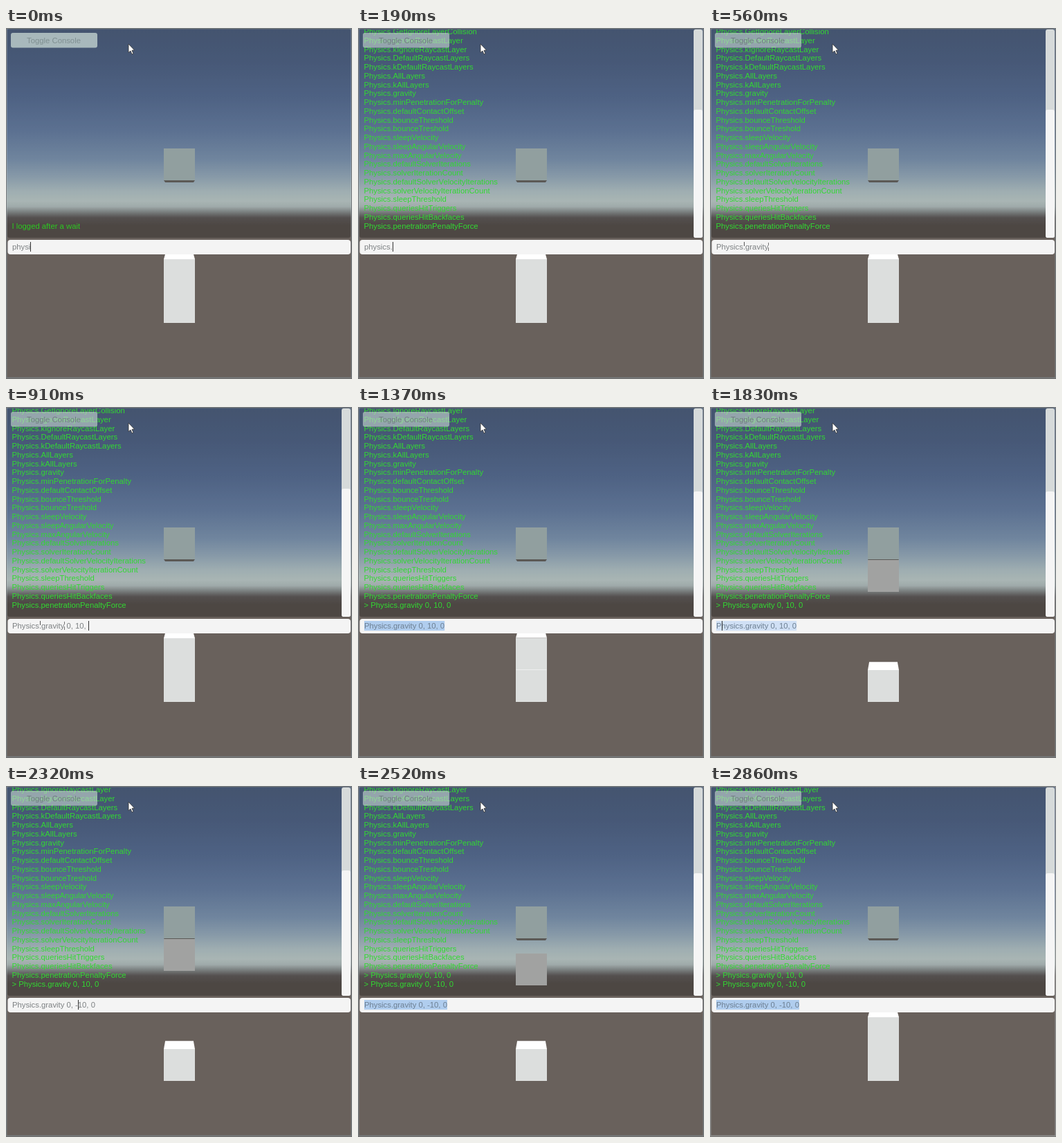
Write an HTML page with a canvas that moves like this. It is 500 px wide and 507 px high and loops after 2880 ms.

```html
<!DOCTYPE html>
<html lang="en">
<head>
<meta charset="utf-8">
<title>Console gravity demo</title>
<style>
  html, body { margin: 0; width: 100%; height: 100%; overflow: hidden; background: #69615c; }
  canvas { display: block; }
</style>
</head>
<body>
<canvas id="stage" width="500" height="507"></canvas>
<script>
const ctx = document.getElementById('stage').getContext('2d');
const LOOP = 2880;
const FONT = '11.3px "Liberation Sans", Arial, sans-serif';
const HORIZON = 253, CENTER = 250.5, DEPTH = 0.093, SIZE = 46;
const TRAVEL = 113, FALL_MS = 176;
const LIST_AT = 190, COMPLETE_AT = 450, UP_AT = 1370, DOWN_AT = 2420;

const members = ('GetIgnoreLayerCollision IgnoreRaycastLayer kIgnoreRaycastLayer ' +
  'DefaultRaycastLayers kDefaultRaycastLayers AllLayers kAllLayers gravity ' +
  'minPenetrationForPenalty defaultContactOffset bounceThreshold bounceTreshold ' +
  'sleepVelocity sleepAngularVelocity maxAngularVelocity defaultSolverIterations ' +
  'solverIterationCount defaultSolverVelocityIterations solverVelocityIterationCount ' +
  'sleepThreshold queriesHitTriggers queriesHitBackfaces penetrationPenaltyForce')
  .split(' ').map(name => 'Physics.' + name);

const UP = 'Physics.gravity 0, 10, 0';
const DOWN = 'Physics.gravity 0, -10, 0';

const sky = ctx.createLinearGradient(0, 0, 0, 285);
[[0, '93,115,152'], [50, '97,121,163'], [100, '107,134,180'], [150, '126,155,199'],
 [190, '153,182,216'], [215, '185,210,230'], [235, '216,237,242'], [250, '231,248,246'],
 [258, '218,233,233'], [266, '164,171,171'], [274, '115,109,108'], [285, '105,97,92']]
  .forEach(([y, rgb]) => sky.addColorStop(y / 285, `rgb(${rgb})`));

function rect(color, x, y, w, h, r = 0) {
  ctx.fillStyle = color;
  ctx.beginPath();
  ctx.roundRect(x, y, w, h, r);
  ctx.fill();
}

function polygon(color, points) {
  ctx.fillStyle = color;
  ctx.beginPath();
  points.forEach(([x, y]) => ctx.lineTo(x, y));
  ctx.closePath();
  ctx.fill();
}

function label(text, x, y, color, align = 'left') {
  ctx.fillStyle = color;
  ctx.textAlign = align;
  ctx.fillText(text, x, y);
}

// A horizontal cube face receding from the front edge at height y.
function face(y, color) {
  const half = 22.5, back = half * (1 - DEPTH), backY = y + (HORIZON - y) * DEPTH;
  polygon(color, [[CENTER - half, y], [CENTER + half, y], [CENTER + back, backY], [CENTER - back, backY]]);
}

function cube(top, front) {
  if (top > HORIZON) face(top, '#fff');
  if (top + SIZE < HORIZON) face(top + SIZE, '#7d7a76');
  rect(front, 228, top, 45, SIZE);
}

// Height of the floating cube, advancing in 20 ms steps.
function lift(t) {
  const fall = (start, first) => {
    const stepped = first + Math.floor((t - first) / 20) * 20;
    return TRAVEL * Math.min(1, Math.max(0, (stepped - start) / FALL_MS) ** 2);
  };
  if (t < UP_AT) return 0;
  return t < 2440 ? fall(1358, UP_AT) : TRAVEL - fall(2444, 2440);
}

// Input text, caret index (-1 when hidden) and selection colour.
function inputState(t) {
  const typed = (text, caret = text.length) => ({ text, caret });
  const selected = (text, color = '#b0cdee') => ({ text, caret: -1, selection: color });
  if (t < LIST_AT) return typed('physics.'.slice(0, 5 + (t >= 20) + (t >= 75) + (t >= 130)));
  if (t < 300) return typed('physics.');
  if (t < COMPLETE_AT) return typed('physics.grav'.slice(0, 9 + Math.floor((t - 300) / 37.5)));
  if (t < 560) return typed(UP.slice(0, 15));
  if (t < 1100) {
    const count = Math.min(8, Math.floor((t - 560) / 43.75));
    return typed(UP.slice(0, 15 + count), count ? 15 + count : -1);
  }
  if (t < UP_AT) return typed(UP, t < 1230 ? UP.length : -1);
  if (t < 1700) return selected(UP);
  if (t < 1930) return { text: UP, caret: t < 1830 ? 0 : 1, selection: '#d0e0f5' };
  if (t < 2270) return typed(UP, Math.min(19, 1 + 1.8 * (1 + Math.floor((t - 1930) / 23.3)) | 0));
  if (t < DOWN_AT) return typed(DOWN, 20);
  return selected(DOWN);
}

function drawScene(t) {
  rect('#69615c', 0, 0, 500, 507);
  rect(sky, 0, 0, 500, 285);
  cube(174, '#c7d9d9');
  cube(380, '#dcdedd');
  if (t >= 1450 && t < 1550) rect('#6485c4', 229, 368, 24, 2.5);
  cube(334 - lift(t), '#dcdedd');
}

function drawConsole(t) {
  rect('rgba(0,0,0,.27)', 2, 1, 496, 302, 3);
  const listed = t >= LIST_AT;
  const lines = listed ? [...members] : ['I logged after a wait'];
  if (t >= UP_AT) lines.push('> ' + UP);
  if (t >= DOWN_AT) lines.push('> ' + DOWN);

  ctx.save();
  ctx.beginPath();
  ctx.rect(2, 2, 482, 301);
  ctx.clip();
  lines.slice(-23).reverse().forEach((line, i) =>
    label(line, 8.5, 289.5 - i * 12.75, listed ? '#32d932' : '#2cc821'));
  ctx.restore();

  if (listed) {
    const handle = t < UP_AT ? 118 : t < DOWN_AT ? 122 : 126;
    rect('#d6dada', 485, 2, 13, 301, 3);
    rect('#f5f5f5', 485, handle, 13, 303 - handle, 3);
  }
  rect(`rgba(202,218,212,${listed ? 0.6 : 0.75})`, 7, 7, 125, 21.5, 3);
  label('Toggle Console', 69, 21.5, listed ? '#707d80' : '#7f8f91', 'center');
}

function drawInput(t) {
  const { text, caret, selection } = inputState(t);
  const width = s => ctx.measureText(s).width;
  rect('#f4f4f4', 2.5, 306, 495.5, 21, 4);
  if (selection) rect(selection, 9, 309, width(text), 14);
  label(text, 9, 320, selection ? '#6c7f92' : '#7d8183');
  if (t >= COMPLETE_AT && t < UP_AT) {
    rect('#555', 49, 309, 1, 6);
    rect('#777', 84, 310, 1, 4);
    rect('#777', 84, 317, 1, 5);
  }
  if (caret >= 0) rect('#333', Math.round(9 + width(text.slice(0, caret))), 309, 1, 14);
}

function drawPointer() {
  const arrow = [[177, 23], [177, 35.5], [180, 33], [182, 37.8], [184, 37], [182, 32.3], [185.5, 32]];
  polygon('#fff', arrow);
  ctx.strokeStyle = '#333';
  ctx.lineWidth = 0.8;
  ctx.stroke();
}

function frame() {
  const t = performance.now() % LOOP;
  ctx.font = FONT;
  drawScene(t);
  drawConsole(t);
  drawInput(t);
  drawPointer();
  ctx.strokeStyle = t < 2760 ? '#777b7d' : '#8c8d8c';
  ctx.lineWidth = 2;
  ctx.strokeRect(0.5, 0.5, 499, 505);
  requestAnimationFrame(frame);
}
frame();
</script>
</body>
</html>
```
